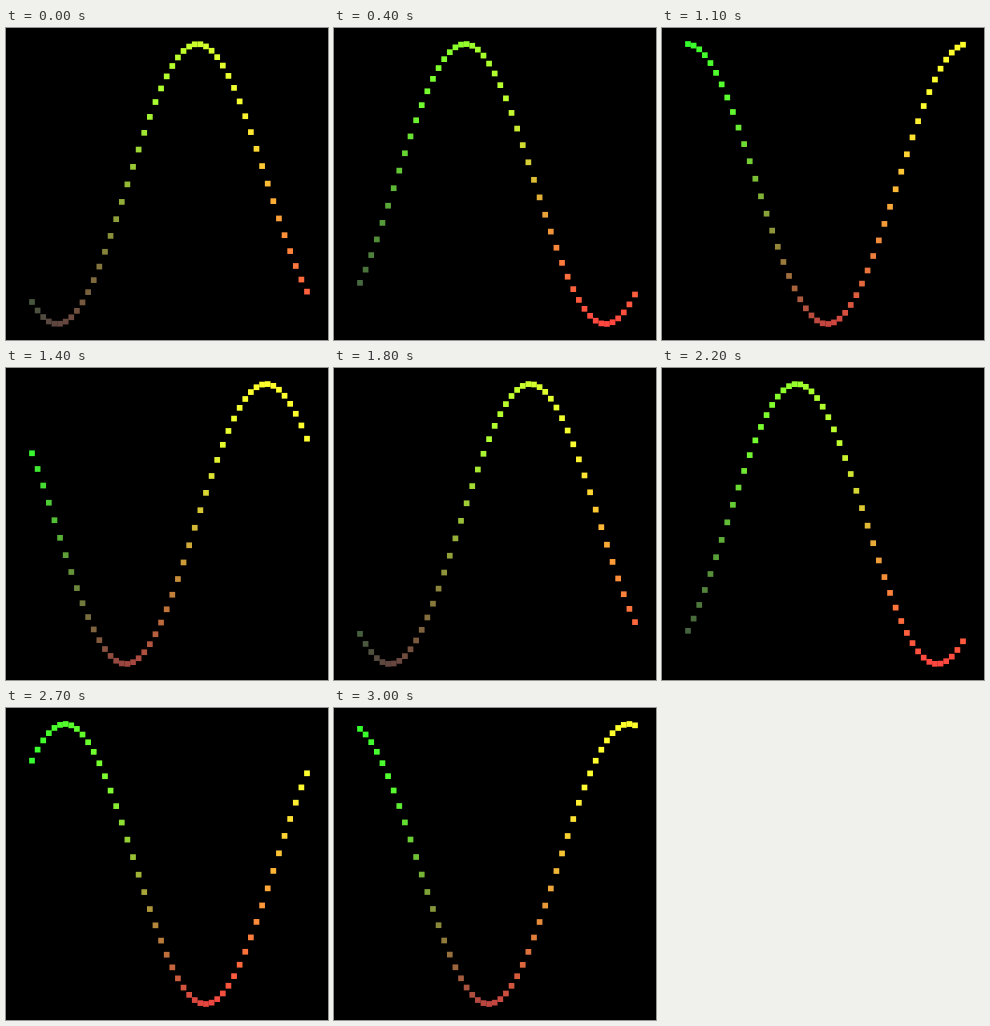
Animation, 322 px wide and 312 px high, one loop 3.1 s. Source, as an HTML page with a canvas:

```html
<!DOCTYPE html>
<html lang="en">
<head>
<meta charset="utf-8">
<title>Sine graph</title>
<style>
  html, body { margin: 0; width: 100%; height: 100%; overflow: hidden; background: #000; }
  canvas { display: block; }
</style>
</head>
<body>
<canvas id="stage" width="322" height="312"></canvas>
<script>
const ctx = document.getElementById('stage').getContext('2d');
const LOOP = 3100, STEP = 100;
const COUNT = 50, SIZE = 5.7;
const LEFT = 26, SPACING = 275 / 49;
const MIDDLE = 156, AMPLITUDE = 140;

// The wave speed drifts slightly: [step, phase in radians]
const phaseKeys = [
  [0, -2.139], [4, -0.784], [8, 0.580], [14, 2.612],
  [18, 4.044], [25, 6.444], [30, 8.118]
];

function phaseAt(step) {
  const k = phaseKeys.findIndex(([s]) => s >= step);
  if (k === 0) return phaseKeys[0][1];
  const [s0, p0] = phaseKeys[k - 1];
  const [s1, p1] = phaseKeys[k];
  return p0 + (p1 - p0) * (step - s0) / (s1 - s0);
}

// Red grows to the right, green grows upward, over a dim ambient floor.
function colorAt(across, height) {
  const floor = 70 - 20 * height;
  const channel = v => Math.min(255, Math.round(v));
  return `rgb(${channel(floor + 255 * across)}, ${channel(floor + 255 * height)}, ${channel(floor - 6)})`;
}

function draw(time) {
  const phase = phaseAt(Math.floor((time % LOOP) / STEP));
  ctx.fillStyle = '#000';
  ctx.fillRect(0, 0, 322, 312);
  for (let i = 0; i < COUNT; i++) {
    const wave = Math.sin(phase + i * 2 * Math.PI / COUNT);
    const x = LEFT + i * SPACING;
    const y = MIDDLE - AMPLITUDE * wave;
    ctx.fillStyle = colorAt((i + 0.5) / COUNT, (wave + 1) / 2);
    ctx.fillRect(x - SIZE / 2, y - SIZE / 2, SIZE, SIZE);
  }
}

const start = performance.now();
function tick() {
  draw(performance.now() - start);
  requestAnimationFrame(tick);
}
tick();
</script>
</body>
</html>
```
